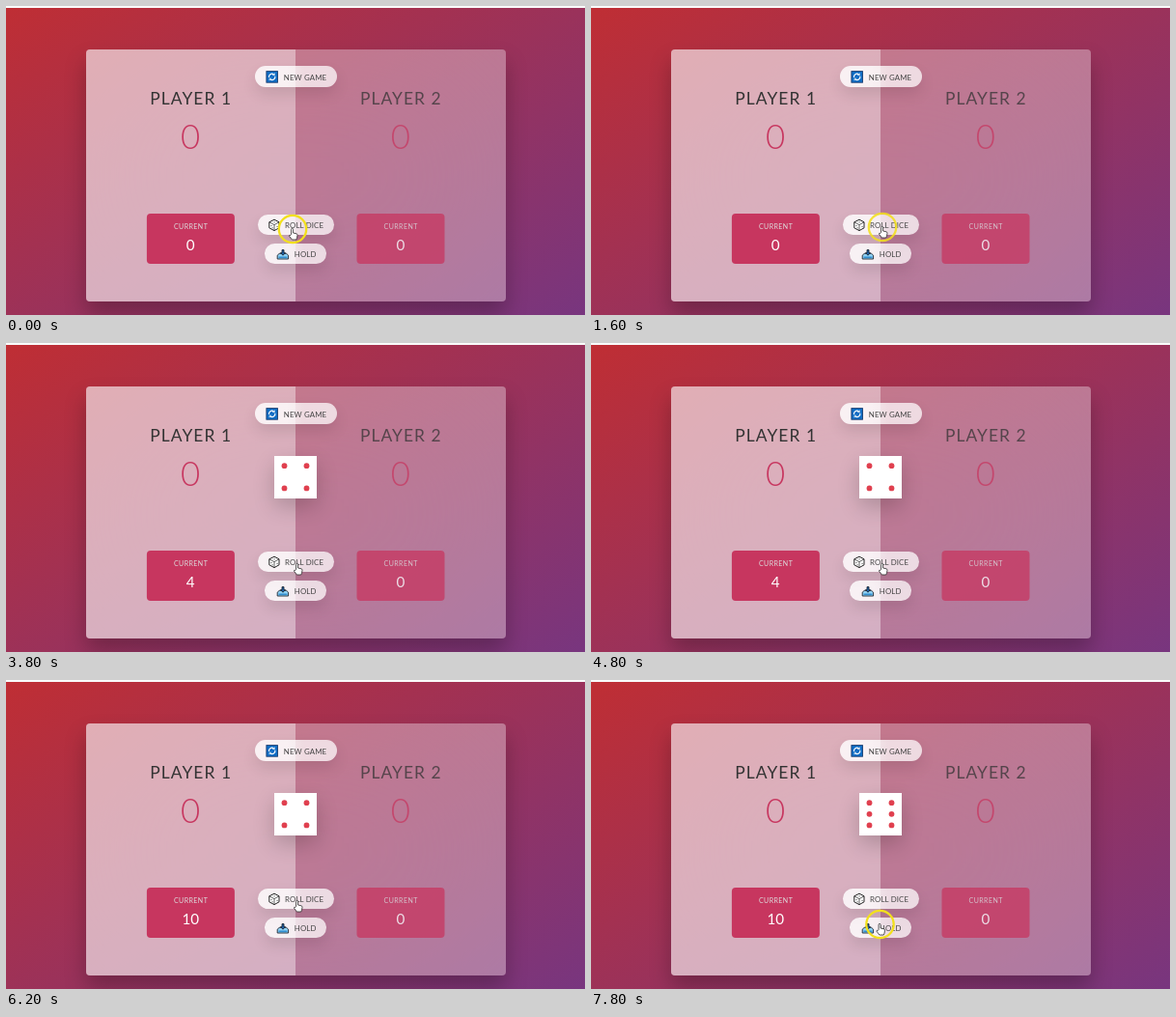
An HTML page for the animation above (8000 ms loop, 600 by 320 pixels).

```html
<!DOCTYPE html>
<html lang="en">
<head>
<meta charset="utf-8">
<title>Dice game</title>
<style>
  html, body { margin: 0; width: 100%; height: 100%; overflow: hidden; background: #fafafa; }
  .stage { position: absolute; left: 0; top: 0; width: 600px; height: 320px; overflow: hidden; }
  .stage > * { position: absolute; }
  .page { left: 0; top: 2px; width: 600px; height: 347px;
    background: linear-gradient(to top left, #753682, #bf2e34); }
  .board { left: 82.5px; top: 45px; width: 435px; height: 261px; border-radius: 4px; overflow: hidden;
    background: rgba(255, 255, 255, .35); backdrop-filter: blur(87px);
    box-shadow: 0 13px 22px rgba(0, 0, 0, .25); }
  .active { width: 217.5px; height: 100%; background: rgba(255, 255, 255, .4); }
  .button { height: 21.4px; border-radius: 11px; box-shadow: 0 7.6px 15px rgba(0, 0, 0, .1);
    background: linear-gradient(to right, rgba(255, 255, 255, .82) calc(50% - 9px), rgba(255, 255, 255, .73) calc(50% + 9px)); }
  .die { left: 278px; top: 117px; width: 44px; height: 43.5px; background: #fff;
    box-shadow: 0 8.7px 22px rgba(0, 0, 0, .2); }
  svg { left: 0; top: 0; }
  text { font-family: Lato, "Open Sans", sans-serif; }
  .name { font-size: 17.4px; fill: #333; letter-spacing: 1.05px; text-anchor: middle; }
  .score { font-size: 34.8px; font-weight: 300; fill: #c7365f; text-anchor: middle; }
  .label { font-size: 7px; fill: #ddd; letter-spacing: .45px; text-anchor: middle; }
  .current { font-size: 15.2px; fill: #fff; text-anchor: middle; }
  .caption { font-size: 7.83px; fill: #444; letter-spacing: .15px; }
</style>
</head>
<body>
<div class="stage">
  <div class="page"></div>
  <div class="board"><div class="active"></div></div>
  <div class="button" style="left:257.5px;top:62.3px;width:85px"></div>
  <div class="button" style="left:260.5px;top:215.8px;width:79px"></div>
  <div class="button" style="left:268px;top:245.7px;width:64px"></div>
  <div class="die" id="die"></div>
  <svg width="600" height="320" viewBox="0 0 600 320">
    <g id="players"></g>
    <g id="pips" fill="#e0404f"></g>

    <text class="caption" x="287.8" y="76.8">NEW GAME</text>
    <text class="caption" x="289" y="230.4">ROLL DICE</text>
    <text class="caption" x="298.8" y="260.3">HOLD</text>

    <g fill="none" stroke="#fff" stroke-width="1.1">
      <rect x="269.9" y="67.6" width="11.6" height="11.6" fill="#0f6cc4" stroke="#1d3f70" stroke-width=".9"/>
      <path d="M272.6 74.2a3.1 3.1 0 0 1 5-3.2M278.8 72.6a3.1 3.1 0 0 1-5 3.2"/>
      <path d="M276.2 71.6h2.1v-2M275.2 75.2h-2.1v2" stroke-width=".8"/>
    </g>
    <g fill="#fff" stroke="#222" stroke-width="1" stroke-linejoin="round">
      <path d="M278 221.2l5 2.6v6l-5 2.8-5.2-2.8v-6z"/>
      <path d="M272.8 223.8l5.2 2.8 5-2.8M278 226.6v6" fill="none" stroke-width=".7"/>
      <path d="M278 223.8h.1M275 227.6h.1M276 229.8h.1M281 228.6h.1" stroke-linecap="round"/>
    </g>
    <g stroke="#1c2733" stroke-width=".9" stroke-linejoin="round">
      <path d="M281.2 258.2l2-1.8h7.4l2 1.8v3.8h-11.4z" fill="#8fd0f2"/>
      <path d="M282.6 260.2h8.8" stroke="#2484cc" stroke-width="1.3"/>
      <path d="M286 252.6h2v3h1.5l-2.5 2.6-2.5-2.6h1.5z" fill="#1b5fa8"/>
    </g>

    <g id="pointer">
      <circle id="halo" r="14.2" fill="none" stroke="#f2e01c" stroke-width="2.3"/>
      <circle id="click" fill="#c9d4ef" fill-opacity=".6" stroke="#4a6fc0" stroke-width="1.8"/>
      <path d="M-1.4 5.6V.4a1 1 0 0 1 2 0V4l3.4.8q1.1.3 1 1.5l-.5 3-.8 1.7H-.6l-3-3.9q.2-1.4 1.5-.7z"
        fill="#fff" stroke="#2b2b2b" stroke-width=".8" stroke-linejoin="round"/>
    </g>
  </svg>
</div>
<script>
const LOOP = 8000, STEP = 200;
const $ = id => document.getElementById(id);

const player = (number, x, opacity) => `
  <g opacity="${opacity}">
    <text class="name" x="${x + .5}" y="102.2">PLAYER ${number}</text>
    <text class="score" x="${x}" y="148">0</text>
    <rect x="${x - 45.3}" y="215" width="91" height="52" rx="4" fill="#c7365f"/>
    <text class="label" x="${x + .4}" y="230.6">CURRENT</text>
    <text class="current" id="current${number}" x="${x}" y="253">0</text>
  </g>`;
$("players").innerHTML = player(1, 191.2, 1) + player(2, 408.8, .75);

// Each row: [time, value...]; hard steps hold, tracks interpolate.
const totals = [[0, 0], [2400, 4], [6200, 10]];
const faces = [[0, 0], [3200, 4], [7200, 6]];
const path = [[0, 297, 231], [600, 302, 229], [7200, 302, 229], [7800, 299.5, 253]];
const halo = [[0, 1], [1400, 1], [2800, 0], [7200, 0], [7400, 1]];
const clicks = [2000, 5600];

const held = (rows, t) => rows.filter(row => row[0] <= t).pop()[1];

function tween(rows, t, column = 1, ease = p => p) {
  const next = rows.findIndex(row => row[0] > t);
  if (next < 0) return rows[rows.length - 1][column];
  const a = rows[next - 1], b = rows[next];
  return a[column] + (b[column] - a[column]) * ease((t - a[0]) / (b[0] - a[0]));
}

const smooth = p => p * p * (3 - 2 * p);

function showFace(face) {
  const rows = face === 6 ? [127.2, 138.8, 150.4] : [127.2, 150.4];
  $("die").style.visibility = face ? "visible" : "hidden";
  $("pips").innerHTML = face
    ? rows.map(y => [288.5, 311.5].map(x => `<circle cx="${x}" cy="${y}" r="2.9"/>`).join("")).join("")
    : "";
}

let last = -1;
function draw(now) {
  const t = Math.floor(now % LOOP / STEP) * STEP;
  if (t !== last) {
    last = t;
    $("current1").textContent = held(totals, t);
    showFace(held(faces, t));
    const x = tween(path, t, 1, smooth), y = tween(path, t, 2, smooth);
    $("pointer").setAttribute("transform", `translate(${x} ${y})`);
    $("halo").setAttribute("opacity", tween(halo, t));
    const age = Math.min(...clicks.map(c => Math.abs(t - c)));
    $("click").setAttribute("r", age ? 3 : 5);
    $("click").setAttribute("opacity", age > STEP ? 0 : age ? .5 : 1);
  }
  requestAnimationFrame(() => draw(performance.now()));
}
draw(performance.now());
</script>
</body>
</html>
```
